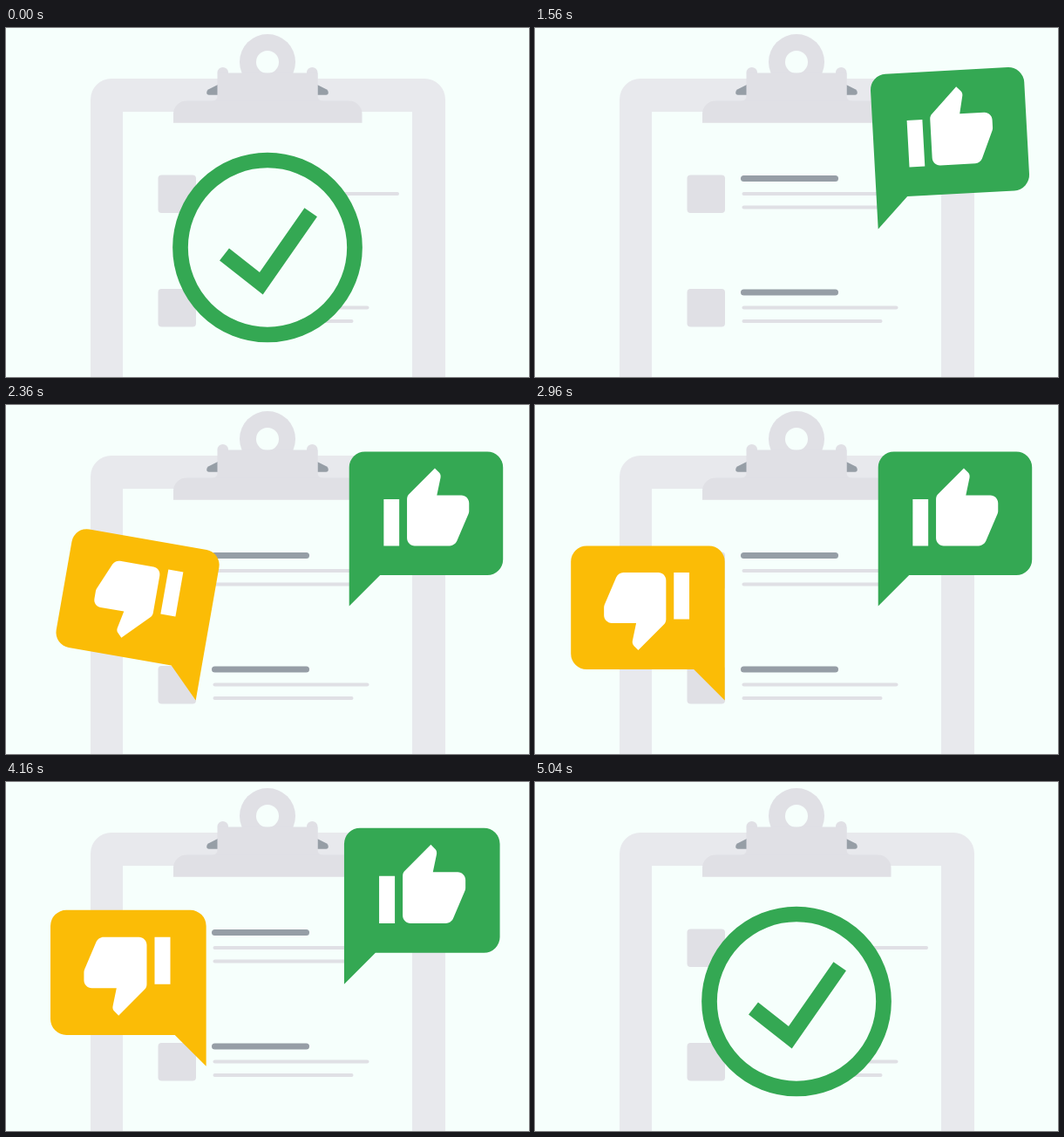
An HTML page with a canvas for the animation above (6.32 s loop, 600 px wide and 400 px high).

```html
<!DOCTYPE html>
<html lang="en">
<head>
<meta charset="utf-8">
<title>Clipboard feedback</title>
<style>
  html, body { margin: 0; width: 100%; height: 100%; overflow: hidden; background: #f6fffc; }
  canvas { display: block; }
</style>
</head>
<body>
<canvas id="stage" width="600" height="400"></canvas>
<script>
const ctx = document.getElementById('stage').getContext('2d');
const LOOP = 6320, STEP = 40;
const BG = '#f6fffc', BOARD = '#e8e9ed', CLIP = '#e0e0e5', DARK = '#969ea6';
const GREEN = '#34a853', YELLOW = '#fbbc06';
const CENTER = { x: 300, y: 251.5 };

const bubbles = [
  { x: 393.7, y: 230.5, dir: 1, color: GREEN, icon: [35.2, -162.5, 4.45], start: 1000, leave: 4100 },
  { x: 217.7, y: 338.5, dir: -1, color: YELLOW, icon: [-36.2, -53, -4.45], start: 2000, leave: 4048 }
];

const thumb = new Path2D(
  'M1 21H5V9H1Z M23 10C23 8.9 22.1 8 21 8H14.7L15.65 3.4C15.75 2.9 15.6 2.4 15.2 2.05' +
  'L14.17 1L7.6 7.6C7.2 7.95 7 8.45 7 9V19C7 20.1 7.9 21 9 21H18C18.8 21 19.5 20.5 19.85 19.8' +
  'L22.85 12.75C22.95 12.5 23 12.25 23 12Z');

const clamp = v => Math.max(0, Math.min(1, v));
const progress = (t, a, b) => clamp((t - a) / (b - a));
const smooth = u => u * u * (3 - 2 * u);
const mix = (a, b, u) => a + (b - a) * u;

function box(x, y, w, h, r, color) {
  ctx.fillStyle = color;
  ctx.beginPath();
  ctx.roundRect(x, y, w, h, r);
  ctx.fill();
}

function disc(x, y, r, color) {
  ctx.fillStyle = color;
  ctx.beginPath();
  ctx.arc(x, y, r, 0, Math.PI * 2);
  ctx.fill();
}

function drawItem(y, lineEnd) {
  box(174.5, y, 43.5, 43.5, 4, CLIP);
  box(236, y + 0.5, 112, 7, 3.5, DARK);
  box(237.5, y + 19.5, lineEnd - 237.5, 4, 2, CLIP);
  box(237.5, y + 35, 161, 4, 2, CLIP);
}

function drawClip() {
  disc(300, 39, 32, CLIP);
  disc(300, 39, 13, BG);
  for (const side of [-1, 1]) {
    ctx.save();
    ctx.translate(300, 0);
    ctx.scale(side, 1);
    ctx.fillStyle = DARK;
    ctx.beginPath();
    ctx.moveTo(57, 65);
    ctx.lineTo(67.5, 70.3);
    ctx.quadraticCurveTo(69.8, 71.5, 69.8, 74);
    ctx.quadraticCurveTo(69.8, 76.8, 67, 76.8);
    ctx.lineTo(57, 76.8);
    ctx.fill();
    box(45, 45, 12.5, 40, [6.2, 6.2, 0, 0], CLIP);
    ctx.beginPath();
    ctx.moveTo(57, 77);
    ctx.quadraticCurveTo(57.5, 83.5, 64, 83.7);
    ctx.lineTo(57, 84);
    ctx.fill();
    ctx.restore();
  }
  box(243, 51.5, 114.5, 40, 0, CLIP);
  box(192, 83.5, 216.5, 25.2, [15, 15, 0, 0], CLIP);
}

function drawBoard() {
  box(97, 58, 407, 380, 24, BOARD);
  box(134, 96, 332, 310, 0, BG);
  drawClip();
  drawItem(168.5, 451);
  drawItem(299, 416.5);
}

// Swing in past upright, tip back slightly, then rest.
function tilt(age) {
  if (age < 400) return mix(96, -13, smooth(age / 400));
  if (age < 650) return mix(-13, 1, smooth((age - 400) / 250));
  return mix(1, 0, smooth(progress(age, 650, 900)));
}

function drawBubble(b, t) {
  const age = t - b.start;
  const out = progress(t, 3840, 4342);
  const grow = smooth(progress(age, 0, 400));
  const size = grow * (1 + out * out * (1.84 - 2.84 * out));
  if (age <= 0 || size <= 0.001) return;
  const move = progress(t, b.leave, 4342) ** 2;

  ctx.save();
  ctx.translate(mix(b.x, CENTER.x, move), mix(b.y, CENTER.y, move));
  ctx.rotate(b.dir * tilt(age) * Math.PI / 180);
  ctx.scale(size, size);

  ctx.save();
  ctx.scale(b.dir, 1);
  ctx.fillStyle = b.color;
  ctx.beginPath();
  ctx.moveTo(0, 0);
  ctx.lineTo(0, -159);
  ctx.arcTo(0, -177, 18, -177, 18);
  ctx.arcTo(176.5, -177, 176.5, -159, 18);
  ctx.arcTo(176.5, -35.5, 158, -35.5, 18);
  ctx.lineTo(35.5, -35.5);
  ctx.closePath();
  ctx.fill();
  ctx.restore();

  const [ix, iy, k] = b.icon;
  ctx.translate(ix, iy);
  ctx.scale(k, k);
  ctx.fillStyle = '#fff';
  ctx.fill(thumb);
  ctx.restore();
}

function drawCheck(t) {
  const u = t < STEP ? 1 : progress(t, 4342, 5040);
  const size = u * (2 - u);
  if (size <= 0) return;
  ctx.save();
  ctx.translate(CENTER.x, CENTER.y);
  ctx.scale(size, size);
  disc(0, 0, 100, BG);
  ctx.strokeStyle = GREEN;
  ctx.lineWidth = 17.7;
  ctx.beginPath();
  ctx.arc(0, 0, 100, 0, Math.PI * 2);
  ctx.stroke();
  ctx.beginPath();
  ctx.moveTo(-49.5, 8);
  ctx.lineTo(-7.2, 41.2);
  ctx.lineTo(49.7, -40.3);
  ctx.stroke();
  ctx.restore();
}

function draw(now) {
  const t = Math.floor((now % LOOP) / STEP) * STEP;
  ctx.fillStyle = BG;
  ctx.fillRect(0, 0, 600, 400);
  drawBoard();
  bubbles.forEach(b => drawBubble(b, t));
  drawCheck(t);
}

const begin = performance.now();
function tick() {
  draw(performance.now() - begin);
  requestAnimationFrame(tick);
}
tick();
</script>
</body>
</html>
```
